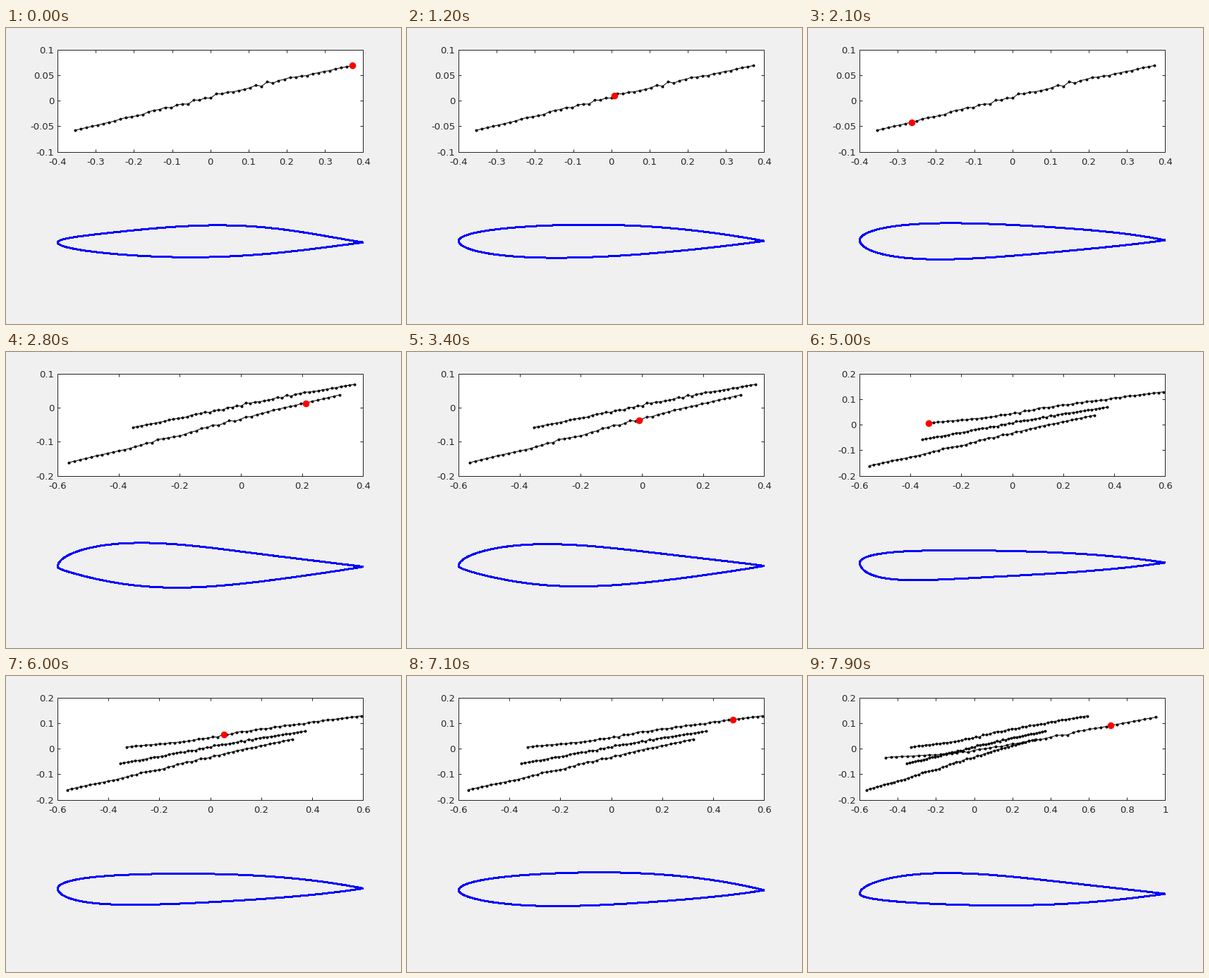
Recreate the animation shown at these times as a matplotlib script. Size 560 px wide and 420 px high, loop 8000 ms.

```python
import numpy as np
import matplotlib.pyplot as plt
from matplotlib.animation import FuncAnimation

W, H, DPI = 560, 420, 100
FRAMES, INTERVAL = 80, 100
RUN, POINTS = 25, 50
LEFT, RIGHT, MID_Y = 73.4, 506.4, 302.6

rng = np.random.default_rng(4)


def px(n):
    return n * 72 / DPI


def series(x0, x1, *trend):
    """Noisy line through evenly spaced heights, in the dot's travel order."""
    t = np.linspace(0, 1, POINTS)
    y = np.interp(t, np.linspace(0, 1, len(trend)), trend)
    y += rng.normal(0, 1.8, POINTS) * np.sin(np.pi * t)
    return x0 + (x1 - x0) * t, y / 1000


SERIES = [
    series(0.371, -0.354, 69, 41, 10, -25, -58),
    series(0.323, -0.562, 38, -9, -60, -113, -161),
    series(-0.329, 0.592, 7, 28, 66, 100, 129),
    series(0.95, -0.464, 124, 75, 22, -19, -34),
]

# (min, max, tick step) for x and y
VIEWS = [
    ((-0.4, 0.4, 0.1), (-0.1, 0.1, 0.05)),
    ((-0.6, 0.4, 0.2), (-0.2, 0.1, 0.1)),
    ((-0.6, 0.6, 0.2), (-0.2, 0.2, 0.1)),
    ((-0.6, 1.0, 0.2), (-0.2, 0.2, 0.1)),
]

# Two key profiles per run: step, then nose-to-tail weights of each surface
PROFILES = [
    ((0, (33, 35, 115, 66), (40, 50, 75, 55)),
     (12, (53, 52, 76, 78), (63, 64, 58, 59))),
    ((3, (90, 104, 51, 56), (32, 110, 66, 73)),
     (15, (63, 94, 44, 62), (38, 98, 68, 78))),
    ((0, (56, 34, 49, 65), (98, 36, 52, 63)),
     (10, (56, 44, 64, 84), (77, 52, 47, 68))),
    ((0, (83, 98, 56, 58), (28, 40, 56, 58)),
     (4, (75, 92, 48, 54), (35, 34, 58, 60))),
]

# Round nose, sharp tail, times cubic Bernstein polynomials
CHORD = (1 - np.cos(np.linspace(0, np.pi, 120))) / 2
BASIS = np.sqrt(CHORD) * (1 - CHORD) * np.array(
    [c * CHORD**i * (1 - CHORD)**(3 - i) for i, c in enumerate((1, 3, 3, 1))])


def airfoil(run, step):
    (ka, *a), (kb, *b) = PROFILES[run]
    a, b = np.array(a), np.array(b)
    upper, lower = (a + (b - a) * (step - ka) / (kb - ka)) @ BASIS
    x = LEFT + (RIGHT - LEFT) * CHORD
    y = np.r_[-upper[::-1], lower[1:]]
    return np.r_[x[::-1], x[1:]], y - (y.min() + y.max()) / 2 + MID_Y


fig = plt.figure(figsize=(W / DPI, H / DPI), dpi=DPI, facecolor="#f0f0f0")

ink = "#262626"
ax = fig.add_axes([73 / W, 244.4 / H, 433.4 / W, 144.6 / H])
for spine in ax.spines.values():
    spine.set(color=ink, linewidth=px(1))
ax.tick_params(direction="in", top=True, right=True, length=px(4.3), width=px(1),
               color=ink, labelcolor=ink, labelsize=px(13.3),
               labelfontfamily="DejaVu Sans")
ax.tick_params(axis="x", pad=px(8.3))
ax.tick_params(axis="y", pad=px(4.8))

curves = [ax.plot(x, y, "k-o", lw=px(1), ms=px(4), mew=0, clip_on=False, zorder=3)[0]
          for x, y in SERIES]
dot, = ax.plot([], [], "o", color="red", ms=px(9.6), mew=0, clip_on=False, zorder=5)

wing_ax = fig.add_axes([72 / W, 0, 435 / W, 1])
wing_ax.set(xlim=(72, 507), ylim=(H, 0))
wing_ax.axis("off")
wing, = wing_ax.plot([], [], color="blue", lw=px(2), antialiased=False)


def ticks(lo, hi, step):
    values = np.round(np.arange(lo, hi + step / 2, step), 4) + 0.0
    return values, [f"{v:g}" for v in values]


def draw(k):
    run, step = divmod(k, RUN)
    xview, yview = VIEWS[run]
    ax.set_xticks(*ticks(*xview))
    ax.set_yticks(*ticks(*yview))
    ax.set(xlim=xview[:2], ylim=yview[:2])
    for i, curve in enumerate(curves):
        curve.set_visible(i <= run)

    pos = (POINTS - 1) * step / (RUN - 1)
    dot.set_data([[np.interp(pos, np.arange(POINTS), v)] for v in SERIES[run]])
    wing.set_data(*airfoil(run, step))
    return [*curves, dot, wing]


anim = FuncAnimation(fig, draw, frames=FRAMES, interval=INTERVAL, repeat=True,
                     repeat_delay=0, blit=False)
plt.show()
```
